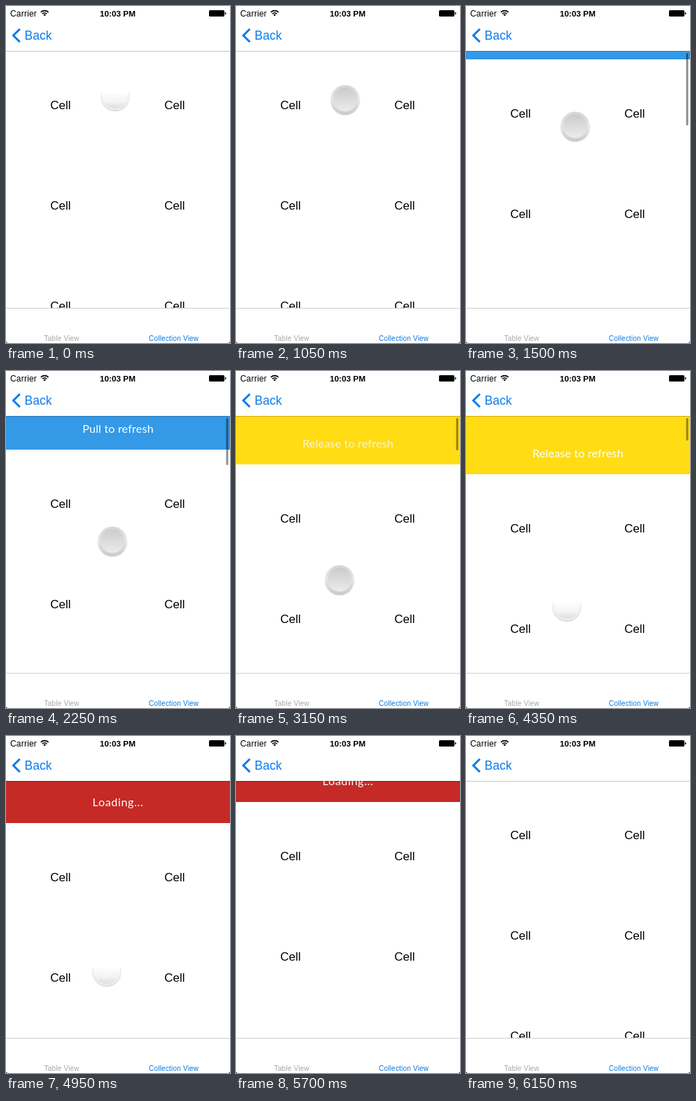
An HTML page for the animation above (7500 ms loop, 320 by 480 pixels).

```html
<!DOCTYPE html>
<html lang="en">
<head>
<meta charset="utf-8">
<title>Pull to refresh</title>
<style>
  html, body { margin: 0; width: 100%; height: 100%; overflow: hidden; background: #fff; }
  svg { display: block; width: 320px; height: 480px; }
  text { font-family: "Liberation Sans", Arial, sans-serif; }
  #cells text { font-size: 17px; text-anchor: middle; }
  #label { font: 16.2px Lato, sans-serif; text-anchor: middle; letter-spacing: .15px; fill: #fff; }
  .tab { font-size: 10px; letter-spacing: .2px; text-anchor: middle; }
</style>
</head>
<body>
<svg viewBox="0 0 320 480">
  <defs>
    <clipPath id="view"><rect y="64" width="320" height="367"/></clipPath>
    <clipPath id="lower"><rect x="-24" y="-5" width="48" height="32"/></clipPath>
    <linearGradient id="rim" x2="0" y2="1">
      <stop offset="0" stop-color="#d6d6d6"/><stop offset=".5" stop-color="#e6e6e6"/><stop offset="1" stop-color="#cdcdcd"/>
    </linearGradient>
    <linearGradient id="dish" x2="0" y2="1">
      <stop offset="0" stop-color="#cbcbcb"/><stop offset="1" stop-color="#ebebeb"/>
    </linearGradient>
    <linearGradient id="pale" x2="0" y2="1">
      <stop offset=".35" stop-color="#fff"/><stop offset=".75" stop-color="#f3f3f3"/><stop offset="1" stop-color="#dcdcdc"/>
    </linearGradient>
    <filter id="soft" x="-30%" y="-30%" width="160%" height="160%"><feGaussianBlur stdDeviation="1.2"/></filter>
  </defs>

  <rect width="320" height="480" fill="#fff"/>
  <g clip-path="url(#view)">
    <rect id="band" y="64" width="320"/>
    <text id="label" x="160"></text>
    <g id="cells"></g>
    <rect id="bar" x="314.5" y="67" width="3" rx="1.5" fill="#000"/>
  </g>

  <rect y="64" width="320" height="1" fill="#000" opacity=".22"/>
  <rect y="430" width="320" height="1" fill="#cfcfcf"/>

  <text x="6" y="15" font-size="12" letter-spacing=".2">Carrier</text>
  <g fill="none" stroke="#000" stroke-width="1.6">
    <path d="M49.8 8.9a7.6 7.6 0 0 1 10.8 0M51.9 11.2a4.6 4.6 0 0 1 6.6 0"/>
    <path d="M53.4 12.4a2.6 2.6 0 0 1 3.6 0L55.2 14.4z" fill="#000" stroke="none"/>
  </g>
  <text x="159.5" y="15" font-size="11.8" font-weight="bold" text-anchor="middle">10:03 PM</text>
  <rect x="290" y="6" width="22" height="9" rx="1.5"/>
  <path d="M312.8 8.5q1.7 .4 1.7 2t-1.7 2z"/>

  <path d="M19.8 32.8L10.5 42l9.3 9.2" fill="none" stroke="#0b7bea" stroke-width="3"/>
  <text x="26.5" y="48" font-size="17.5" fill="#0b7bea">Back</text>
  <text class="tab" x="79.7" y="476.5" fill="#a6a6a6">Table View</text>
  <text class="tab" x="239.7" y="476.5" fill="#0b78dc">Collection View</text>
  <path d="M0 478v2h2zM320 478v2h-2z" fill="#444"/>

  <g id="touch">
    <g id="solid">
      <circle cy="2" r="20" fill="#000" opacity=".28" filter="url(#soft)"/>
      <circle r="20.5" fill="url(#rim)"/>
      <circle r="17" fill="url(#dish)"/>
    </g>
    <g id="faint" clip-path="url(#lower)">
      <circle cy="2" r="19.5" fill="#000" opacity=".26" filter="url(#soft)"/>
      <circle r="20.5" fill="#ededed"/>
      <circle cy="-1" r="19" fill="url(#pale)"/>
    </g>
  </g>
</svg>

<script>
const LOOP = 7500, STEP = 150;
const $ = id => document.getElementById(id);
const set = (el, attrs) => { for (const k in attrs) el.setAttribute(k, attrs[k]); };

// time, value
const PULL = [
  [1050, 0], [1200, 3], [1350, 7], [1500, 12], [1800, 28], [2250, 48], [3000, 60], [3150, 69], [4050, 83],
  [4350, 83], [4500, 78], [4650, 69], [4800, 62], [4950, 60],
  [5250, 60], [5400, 57], [5550, 46], [5700, 30], [5850, 14], [6000, 4], [6150, 0]
];
const TOUCH_Y = [[900, 128], [1050, 133], [1500, 171], [2250, 242], [3000, 276], [3150, 297], [4050, 335]];
const TOUCH_X = [[1500, 156], [2250, 152], [3150, 148], [4050, 144]];

// start, colour, label, letter spacing
const STATES = [
  [0, "#3499e7", "Pull to refresh", .15],
  [3000, "#ffdc14", "Release to refresh", .15],
  [4500, "#c52a26", "Loading...", .6]
];

function at(keys, t) {
  const i = keys.findIndex(k => k[0] > t);
  if (i < 0) return keys[keys.length - 1][1];
  if (i === 0) return keys[0][1];
  const [t0, a] = keys[i - 1], [t1, b] = keys[i];
  return a + (b - a) * (t - t0) / (t1 - t0);
}

for (const y of [147, 290, 433]) for (const x of [78, 241]) {
  const cell = document.createElementNS("http://www.w3.org/2000/svg", "text");
  set(cell, { x, y });
  cell.textContent = "Cell";
  $("cells").append(cell);
}

function draw(time) {
  const t = Math.floor((time % LOOP) / STEP) * STEP;
  const pull = Math.round(at(PULL, t));
  const [, color, text, spacing] = STATES.filter(s => s[0] <= t).pop();

  set($("band"), { height: pull, fill: color });
  set($("label"), {
    y: pull + 39.5,
    opacity: pull ? at([[2850, 1], [3000, .55], [3150, .75], [3300, 1]], t) : 0
  });
  $("label").style.letterSpacing = spacing + "px";
  $("label").textContent = text;
  set($("cells"), { transform: `translate(0 ${pull})` });
  set($("bar"), {
    height: 115 - pull,
    opacity: t < 1200 ? 0 : at([[1200, .3], [1500, .45], [4350, .4], [4800, 0]], t)
  });

  const held = t >= 600 && t < 4350;
  set($("touch"), { transform: `translate(${at(TOUCH_X, t)} ${at(TOUCH_Y, t)})` });
  set($("solid"), { opacity: held ? (t < 750 ? .7 : 1) : 0 });
  set($("faint"), { opacity: held || t >= 5400 ? 0 : 1 });
}

const start = performance.now();
function tick() {
  draw(performance.now() - start);
  requestAnimationFrame(tick);
}
tick();
</script>
</body>
</html>
```
